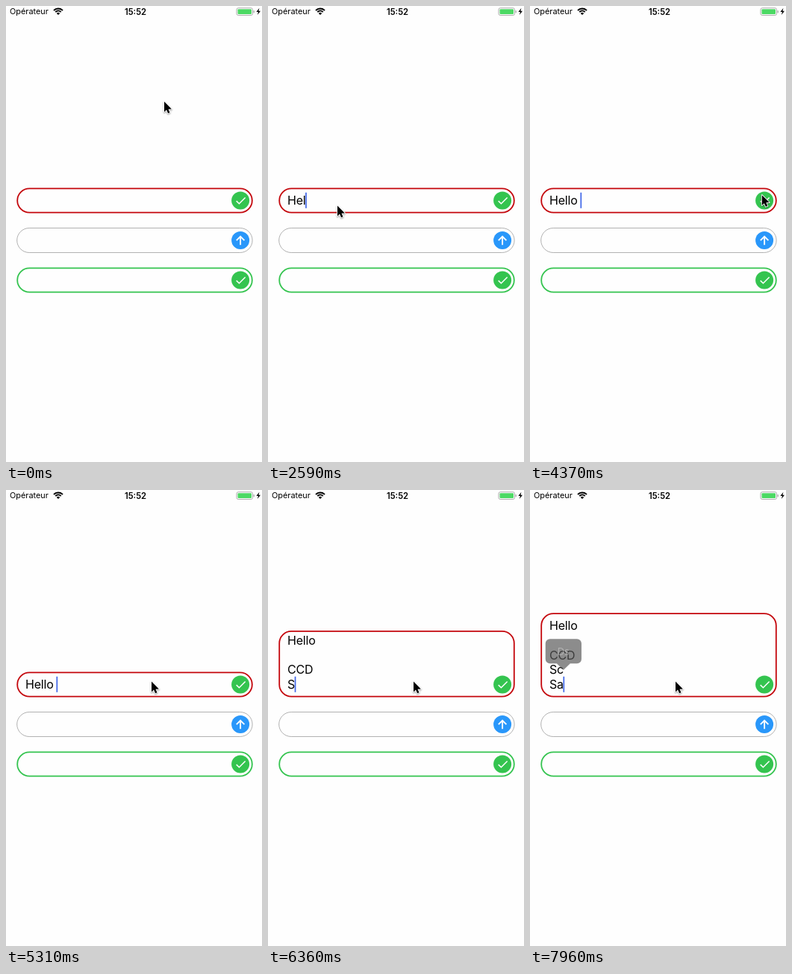
An HTML page with a canvas for the animation above (8000 ms loop, 343 by 613 pixels).

```html
<!DOCTYPE html>
<html lang="fr">
<head>
<meta charset="utf-8">
<style>
  html, body { margin: 0; width: 100%; height: 100%; overflow: hidden; background: #fefefe; }
  canvas { display: block; width: 343px; height: 613px; }
</style>
</head>
<body>
<canvas id="stage"></canvas>
<script>
const LOOP = 8000, W = 343, H = 613;
const RED = '#c4060c', GREEN = '#34c44f', BLUE = '#2997fa', CARET = '#3f66e8';
const FONT = 'Inter, Roboto, sans-serif';
const FIELD = { x: 15.2, width: 314.6, bottom: 277.6, height: 32.2 };
const LINE = 19.8, MAX_LINES = 5, TEXT_X = 26;
const MESSAGE = 'Hello \n\nCCD\nSc\nSa\nC\nD';
const TAP = 1220;

// Bursts of key presses; negative keys delete
const bursts = [
  { at: 2230, keys: 1 },
  { at: 2530, keys: 2 },
  { at: 2760, keys: 1 },
  { at: 3120, keys: 2 },
  { at: 5600, keys: 1 },
  { at: 6050, keys: 14 },
  { at: 7330, keys: -4, gap: 110 }
];

// Pointer glides; "bend" bows the path sideways
const glides = [
  { start: 500, end: 900, from: [212, 128], to: [72, 263], bend: [-35, 0] },
  { start: 1580, end: 1580, from: [93, 268], to: [93, 268], bend: [0, 0] },
  { start: 3680, end: 4430, from: [132, 256], to: [314, 256], bend: [0, -10] },
  { start: 4670, end: 5310, from: [314, 256], to: [195, 257], bend: [0, 7] }
];

const canvas = document.getElementById('stage');
const ctx = canvas.getContext('2d');
const ratio = window.devicePixelRatio || 1;
canvas.width = Math.round(W * ratio);
canvas.height = Math.round(H * ratio);

const clamp = v => Math.max(0, Math.min(1, v));
const lerp = (a, b, k) => a + (b - a) * k;
const smooth = k => k * k * (3 - 2 * k);

function fill(color) {
  ctx.fillStyle = color;
  ctx.fill();
}

function stroke(color, width) {
  ctx.strokeStyle = color;
  ctx.lineWidth = width;
  ctx.stroke();
}

function polyline(points, x = 0, y = 0) {
  ctx.beginPath();
  for (const [px, py] of points) ctx.lineTo(x + px, y + py);
}

function roundBox(x, y, w, h, r) {
  ctx.beginPath();
  ctx.roundRect(x, y, w, h, r);
}

function setFont(size, weight = 400, spacing = 0) {
  ctx.font = `${weight} ${size}px ${FONT}`;
  ctx.letterSpacing = spacing + 'px';
}

function text(value, x, y, color = '#000', align = 'left') {
  ctx.textAlign = align;
  ctx.fillStyle = color;
  ctx.fillText(value, x, y);
}

function statusBar() {
  setFont(10.9);
  text('Opérateur', 5, 11.3);
  setFont(11.2, 600);
  text('15:52', 173.5, 11.7, '#000', 'center');

  const left = -Math.PI * 0.76, right = -Math.PI * 0.24;
  for (const r of [8.2, 5.1]) {
    ctx.beginPath();
    ctx.arc(70, 11.6, r, left, right);
    stroke('#000', 2);
  }
  ctx.beginPath();
  ctx.moveTo(70, 12);
  ctx.arc(70, 12, 3, left, right);
  fill('#000');

  roundBox(309, 2.7, 21.5, 9.8, 2.2);
  stroke('#a4a4a4', 0.9);
  roundBox(310.5, 4.2, 18.5, 6.8, 1);
  fill('#4cd964');
  roundBox(331.6, 6, 1.2, 3.4, 0.6);
  fill('#a4a4a4');
  polyline([[339.4, 2.8], [335.4, 8], [338, 8], [336.8, 12], [341, 6.7], [338.4, 6.7]]);
  fill('#000');
}

function button(y, color) {
  ctx.beginPath();
  ctx.arc(314.1, y, 12, 0, Math.PI * 2);
  fill(color);
}

function checkButton(y) {
  button(y, GREEN);
  polyline([[-5.3, 0.5], [-1.6, 4.2], [6.6, -4.1]], 314, y);
  stroke('#fff', 1.5);
}

function arrowButton(y) {
  button(y, BLUE);
  polyline([[0, 6.2], [0, -5]], 314.1, y);
  stroke('#fff', 1.9);
  polyline([[-5.3, 0.2], [0, -5.2], [5.3, 0.2]], 314.1, y);
  stroke('#fff', 1.9);
}

// Number of characters in the message and the time of the latest key press
function typingAt(t) {
  let count = 0, lastKey = TAP;
  for (const { at, keys, gap = 55 } of bursts) {
    if (t < at) break;
    const pressed = Math.min(Math.abs(keys), Math.floor((t - at) / gap) + 1);
    count += Math.sign(keys) * pressed;
    lastKey = at + (pressed - 1) * gap;
  }
  return { count, lastKey };
}

const rowsAt = t => MESSAGE.slice(0, typingAt(t).count).split('\n');

// The field follows its line count with a short glide
function fieldHeight(t) {
  const linesAt = time => Math.min(MAX_LINES, rowsAt(time).length);
  const samples = 10, delay = 120;
  let lines = 0;
  for (let i = 0; i < samples; i++) lines += linesAt(t - delay * i / samples) / samples;
  return FIELD.height + LINE * (lines - 1);
}

function caretAlpha(sinceKey) {
  const phase = sinceKey % 1000;
  return phase < 800 ? 1 - clamp((phase - 540) / 110) : clamp((phase - 920) / 80);
}

function bubble(x, label, alpha) {
  setFont(13);
  const half = ctx.measureText(label).width / 2 + 16;
  ctx.save();
  ctx.globalAlpha = alpha;
  roundBox(x - half, 200.2, half * 2, 33, 6);
  ctx.moveTo(x - 9, 233.2);
  ctx.lineTo(x, 242);
  ctx.lineTo(x + 9, 233.2);
  fill('#575757');
  ctx.globalAlpha = alpha * 0.5;
  text(label, x, 221.6, '#fff', 'center');
  ctx.restore();
}

function messageField(t) {
  const rows = rowsAt(t);
  const height = fieldHeight(t), top = FIELD.bottom - height;
  const baseline = rows.length > MAX_LINES ? 275 : 267.2;

  ctx.save();
  ctx.beginPath();
  ctx.rect(FIELD.x, top, FIELD.width, height);
  ctx.clip();
  setFont(16, 400, -0.2);
  rows.forEach((row, i) => text(row, TEXT_X, baseline - (rows.length - 1 - i) * LINE));
  const caretX = TEXT_X + ctx.measureText(rows.at(-1)).width;
  if (t >= TAP) {
    ctx.globalAlpha = caretAlpha(t - typingAt(t).lastKey);
    ctx.fillStyle = CARET;
    ctx.fillRect(caretX - 0.4, baseline - 16.4, 1.7, 21);
  }
  ctx.restore();

  roundBox(FIELD.x, top, FIELD.width, height, 16.1);
  stroke(RED, 1.8);
  checkButton(261.6);

  if (t >= 5600 && t < 5780) bubble(caretX, '', 0.68 * (1 - (t - 5600) / 180));
  if (t >= 7900) bubble(caretX, 'Ds', 0.68 * clamp((t - 7840) / 120));
}

function pointerAt(t) {
  const { start, end, from, to, bend } = glides.findLast(g => g.start <= t) || glides[0];
  const k = end > start ? clamp((t - start) / (end - start)) : 1;
  return [0, 1].map(i => lerp(from[i], to[i], smooth(k)) + bend[i] * Math.sin(Math.PI * k));
}

function pointer(t) {
  const [x, y] = pointerAt(t);
  polyline([[0, 0], [0, 13.8], [3, 11], [5.1, 15.6], [7.5, 14.6], [5.5, 10.1], [9.9, 9.9]], x, y + 0.6);
  ctx.closePath();
  ctx.save();
  ctx.lineJoin = 'round';
  ctx.shadowColor = 'rgba(0,0,0,.4)';
  ctx.shadowBlur = 2 * ratio;
  ctx.shadowOffsetY = ratio;
  stroke('#fff', 1.8);
  ctx.restore();
  fill('#000');
}

function draw(t) {
  ctx.setTransform(ratio, 0, 0, ratio, 0, 0);
  ctx.fillStyle = '#fefefe';
  ctx.fillRect(0, 0, W, H);
  statusBar();
  messageField(t);

  roundBox(14.7, 298.5, 315.4, 33, 16.5);
  stroke('#a9a9a9', 0.9);
  arrowButton(315);

  roundBox(FIELD.x, 352.4, FIELD.width, FIELD.height, 16.1);
  stroke(GREEN, 1.8);
  checkButton(368.6);

  pointer(t);
}

const start = performance.now();
function tick() {
  draw((performance.now() - start) % LOOP);
  requestAnimationFrame(tick);
}
tick();
</script>
</body>
</html>
```
